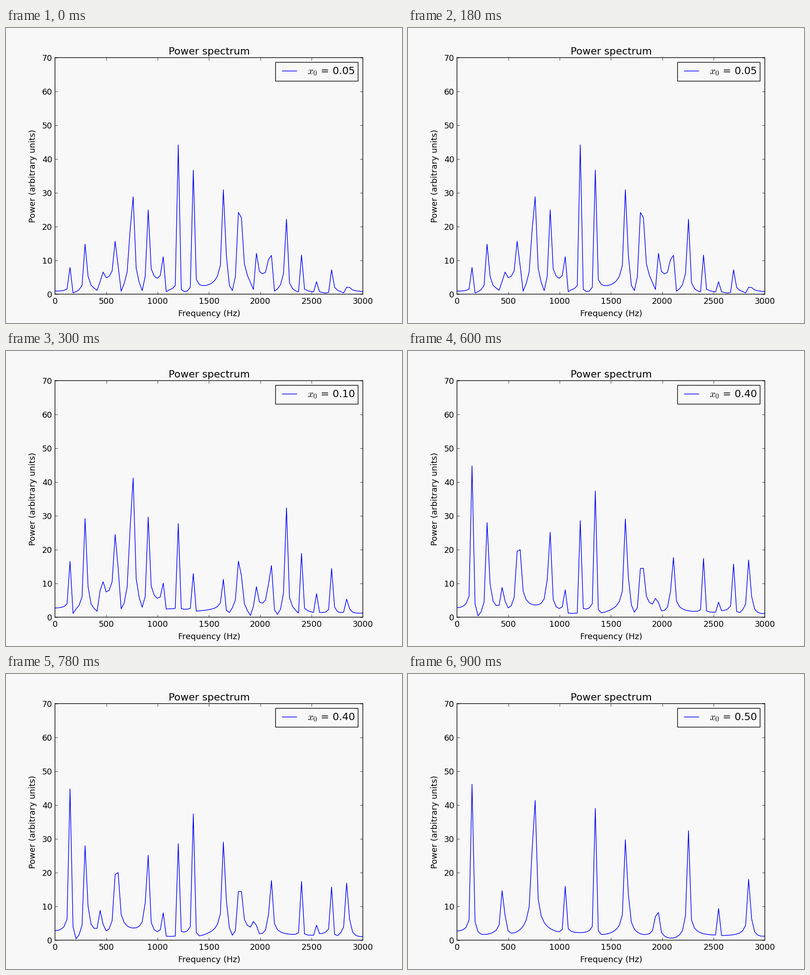
Recreate the animation shown at these times as a matplotlib script. Size 867 by 646 pixels, loop 1.2 s.

```python
import numpy as np
import matplotlib.pyplot as plt
from matplotlib.animation import FuncAnimation
from matplotlib.lines import Line2D
from matplotlib.patches import Rectangle
from matplotlib.transforms import Affine2D

W, H, DPI = 867, 646, 100
LEFT, RIGHT, TOP, BOTTOM = 107.3, 781.3, 64.8, 582.8
PAPER = "#f8f8f8"
BLUE = "#0000ff"
PLUCKS = (0.05, 0.10, 0.40, 0.50)

# String of unit length, wave speed 300 m/s, heard at x = 0.3
CELLS, PICKUP = 100, 30
SAMPLES, DT = 1024, 1 / 30000

plt.rcParams.update({
    "font.family": "DejaVu Sans",
    "mathtext.fontset": "cm",
    "axes.linewidth": 1.0,
    "path.snap": False,
})


def pt(px):
    return px * 72 / DPI


TICK, LABEL, LARGE = pt(17.9), pt(18.2), pt(22)


def spectrum(x0):
    """Magnitude spectrum of a string plucked with a narrow Gaussian at x0."""
    x = np.linspace(0, 1, CELLS + 1)
    now = np.exp(-1000 * (x - x0) ** 2)
    now[0] = now[-1] = 0
    before = now.copy()
    signal = np.empty(SAMPLES)
    for n in range(SAMPLES):
        signal[n] = now[PICKUP]
        after = np.zeros_like(now)
        after[1:-1] = now[2:] + now[:-2] - before[1:-1]
        before, now = now, after
    return np.abs(np.fft.rfft(signal))


freqs = np.fft.rfftfreq(SAMPLES, DT)
spectra = [spectrum(x0) for x0 in PLUCKS]

fig = plt.figure(figsize=(W / DPI, H / DPI), dpi=DPI, facecolor=PAPER)
ax = fig.add_axes([LEFT / W, 1 - BOTTOM / H,
                   (RIGHT - LEFT) / W, (BOTTOM - TOP) / H])
ax.set(facecolor=PAPER, xlim=(0, 3000), ylim=(0, 70),
       xticks=range(0, 3001, 500), yticks=range(0, 71, 10))
ax.tick_params(direction="in", top=True, right=True, length=pt(6),
               width=0.55, labelsize=TICK)
ax.tick_params(axis="x", pad=pt(7.5))
ax.tick_params(axis="y", pad=pt(6))
curve, = ax.plot([], [], color=BLUE, lw=1.05)


def label(x, y, text, size, **kw):
    kw = {"ha": "center", "va": "baseline", **kw}
    return fig.text(x / W, 1 - y / H, text, fontsize=size, **kw)


def place(artist):
    """Put an artist on the figure in pixels measured from the top left."""
    flip = Affine2D().scale(1 / W, -1 / H).translate(0, 1)
    artist.set_transform(flip + fig.transFigure)
    fig.add_artist(artist)


label(444.5, 57.5, "Power spectrum", LARGE)
label(444.5, 631, "Frequency (Hz)", LABEL)
label(64.5, 324.5, "Power (arbitrary units)", LABEL,
      rotation=90, rotation_mode="anchor")

place(Rectangle((590.2, 75.2), 180.6, 41.2, fc=PAPER, ec="black", lw=1))
place(Line2D([605, 636.5], [94.2, 94.2], color=BLUE, lw=1.05))
caption = label(660, 101.5, "", LARGE, ha="left")


def update(i):
    curve.set_data(freqs, spectra[i])
    caption.set_text(f"$x_0$ = {PLUCKS[i]:.2f}")
    return curve, caption


anim = FuncAnimation(fig, update, frames=len(PLUCKS), interval=300,
                     repeat=True, repeat_delay=0, blit=False)
plt.show()
```
